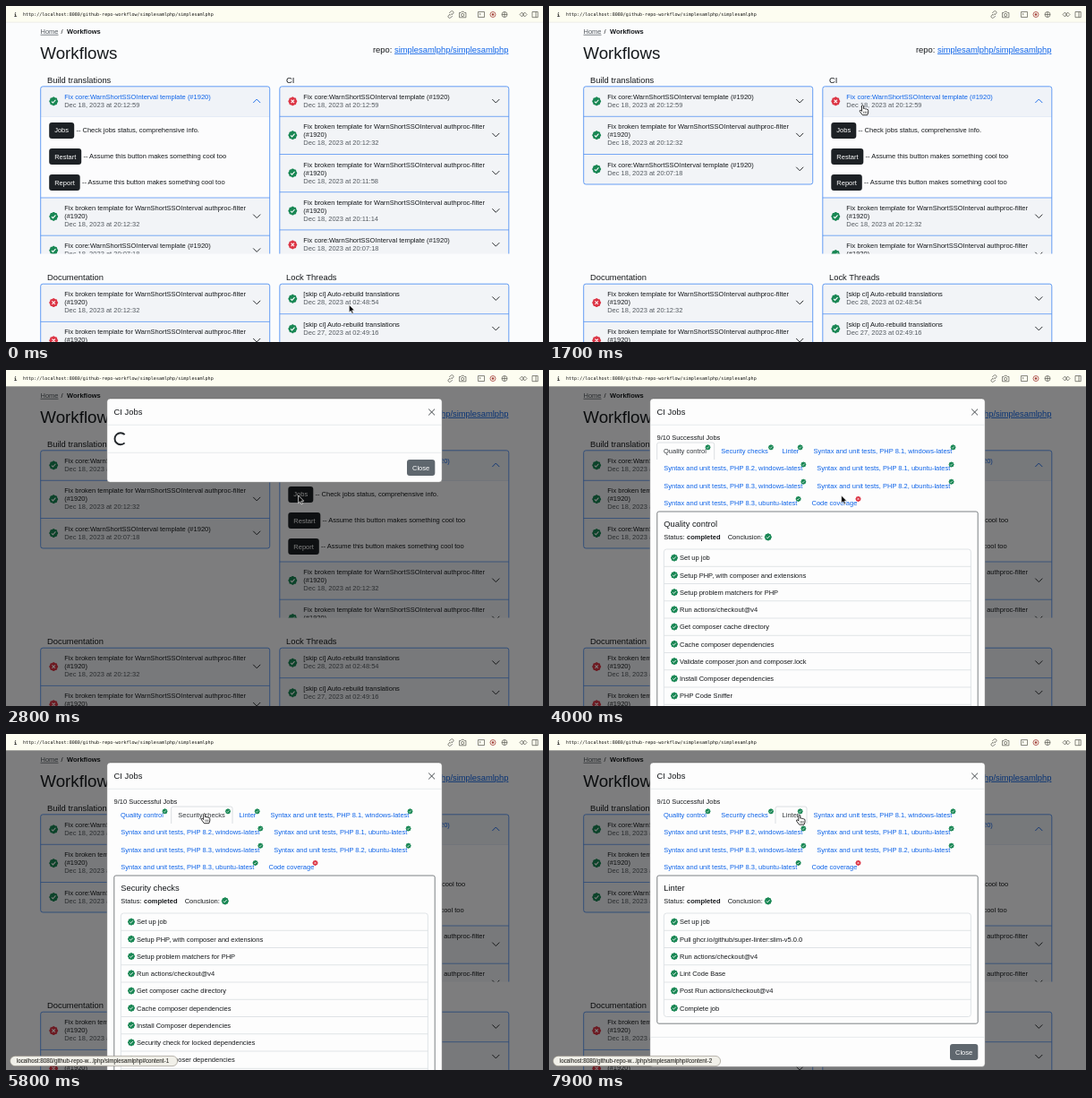
These frames come from a looping animation (600x375 px, 8000 ms). An HTML page:

```html
<!DOCTYPE html>
<html lang="en">
<head>
<meta charset="utf-8">
<title>Workflows</title>
<style>
html, body { margin: 0; width: 100%; height: 100%; overflow: hidden; background: #fbfcfd; }
svg { display: block; width: 600px; height: 375px; font: 7.5px "Liberation Sans", Arial, sans-serif; }
.mono { font-family: "DejaVu Sans Mono", monospace; }
</style>
</head>
<body>
<svg viewBox="0 0 600 375">
  <defs>
    <clipPath id="top"><rect y="89" width="600" height="187.5"/></clipPath>
    <path id="tick" d="M-2.1 .2L-.7 1.6L2.1-1.5" fill="none" stroke="#fff" stroke-width="1"/>
    <path id="cross" d="M-1.6-1.6L1.6 1.6M1.6-1.6L-1.6 1.6" fill="none" stroke="#fff" stroke-width="1"/>
    <path id="arrow" d="M0 0V8.6L2 6.8L3.4 9.9L4.9 9.2L3.5 6.2H6.2Z" fill="#000" stroke="#fff" stroke-width=".7"/>
    <g id="hand" fill="#fff" stroke="#000" stroke-width=".8" stroke-linejoin="round">
      <path d="M-1 1Q0-.6 1 1V4.2Q2.3 3.2 2.9 4.5Q4.2 3.7 4.7 5Q6.2 4.6 6.2 6.2V8.4L5.2 11.2H-.2L-3.2 7.2Q-3.6 5.6-2.2 5.8L-1 7Z"/>
      <path d="M1.2 7V9.6M2.8 7V9.6M4.4 7V9.6" stroke-width=".5"/>
    </g>
  </defs>
  <g id="page"></g>
  <rect id="shade" y="18" width="600" height="357"/>
  <g id="modal"></g>
  <g id="bar"></g>
  <g id="status"></g>
  <g id="cursor"></g>
</svg>
<script>
const LOOP = 8000, GREEN = '#198754', RED = '#dc3545', BLUE = '#0d63e8', INK = '#16191c';
const OPEN_CI = 1200, OPEN_MODAL = 2290, LOADED = 3500, TAB_CLICKS = [5500, 7400];

const clamp = v => Math.max(0, Math.min(1, v));
const span = (t, start, length) => clamp((t - start) / length);
const smooth = p => p * p * (3 - 2 * p);

// Drawing helpers
const text = (x, y, s, fill = INK, more = '') => `<text x="${x}" y="${y}" fill="${fill}" ${more}>${s}</text>`;
const big = (x, y, s) => text(x, y, s, INK, 'font-size="9.375"');
const rect = (x, y, w, h, fill, more = '') =>
  `<rect x="${x}" y="${y}" width="${w}" height="${h}" fill="${fill}" ${more}/>`;
const path = (d, stroke, width = 1) => `<path d="${d}" fill="none" stroke="${stroke}" stroke-width="${width}"/>`;
const button = (x, y, w, s, fill) => rect(x, y, w, 18, fill, 'rx="3"') + text(x + 6, y + 11.6, s, '#fff');

function badge(x, y, ok, r = 4) {
  const points = Array.from({ length: 64 }, (_, i) => {
    const a = i * Math.PI / 32, d = r * (1 + .06 * Math.cos(8 * a));
    return (d * Math.cos(a)).toFixed(2) + ',' + (d * Math.sin(a)).toFixed(2);
  });
  return `<g transform="translate(${x} ${y})"><polygon points="${points.join(' ')}" fill="${ok ? GREEN : RED}"/>` +
    `<use href="#${ok ? 'tick' : 'cross'}" transform="scale(${r / 4.4})"/></g>`;
}

// Page
const CORE = ['Fix core:WarnShortSSOInterval template (#1920)'];
const BROKEN = ['Fix broken template for WarnShortSSOInterval authproc-filter', '(#1920)'];
const SKIP = ['[skip ci] Auto-rebuild translations'];
const run = (ok, lines, time, day = 18) => ({ ok, lines, date: `Dec ${day}, 2023 at ${time}` });

const BUILD = [run(1, CORE, '20:12:59'), run(1, BROKEN, '20:12:32'), run(1, CORE, '20:07:18')];
const CI = [run(0, CORE, '20:12:59'), run(1, BROKEN, '20:12:32'), run(1, BROKEN, '20:11:58'),
  run(1, BROKEN, '20:11:14'), run(0, CORE, '20:07:18')];
const DOCS = [run(0, BROKEN, '20:12:32'), run(0, BROKEN, '20:11:58')];
const LOCK = [run(1, SKIP, '02:48:54', 28), run(1, SKIP, '02:49:16', 27)];
const ACTIONS = [['Jobs', 28, 'Check jobs status, comprehensive info.'],
  ['Restart', 36, 'Assume this button makes something cool too'],
  ['Report', 34.5, 'Assume this button makes something cool too']];

function card(x, top, runs, open = 0) {
  let y = top, out = '';
  runs.forEach((r, i) => {
    const h = r.lines.length > 1 ? 42.2 : 33.5, p = i ? 0 : open, mid = y + h / 2;
    out += rect(x, y, 256, h, p > .5 ? '#f0f3f8' : '#f2f4f7');
    if (i) out += path(`M${x} ${y}h256`, '#3f86f2', .7);
    out += badge(x + 14.5, mid - .2, r.ok, 4.7);
    r.lines.forEach((s, n) => out += text(x + 26.5, y + 14 + 9 * n, s, p > .5 ? BLUE : INK));
    out += text(x + 26.5, y + 14 + 9 * r.lines.length, r.date, '#555b61');
    out += `<g transform="translate(${x + 241.5} ${mid - .5}) rotate(${-180 * p})">` +
      path('M-4-2L0 2L4-2', p > .5 ? BLUE : INK, .9) + '</g>';
    y += h;
    if (p) {
      const body = 90.7 * p;
      out += `<svg x="${x}" y="${y}" width="256" height="${body}" style="width:256px;height:${body}px">` +
        rect(0, 0, 256, 91, '#fcfcfd') + path('M0 .2h256', '#c9d8ee', .6) +
        ACTIONS.map(([name, w, note], n) => {
          const at = 6.6 + 29.1 * n;
          return button(9.5, at, w, name, '#1d2125') + text(w + 11.7, at + 11.2, '-- ' + note);
        }).join('') + '</svg>';
      y += body;
    }
  });
  return out + rect(x, top, 256, y - top, 'none', 'rx="2.5" stroke="#3f86f2" stroke-width=".8"');
}

function page(t) {
  const p = smooth(span(t, OPEN_CI, 350));
  return rect(0, 0, 600, 375, '#fbfcfd') +
    text(38.5, 30.8, 'Home', '#555b61', 'text-decoration="underline"') + text(61.5, 30.8, '/') +
    text(68, 30.8, 'Workflows', INK, 'font-weight="bold"') +
    text(38.3, 59.3, 'Workflows', INK, 'font-size="18.75"') +
    big(410, 51.8, 'repo:') +
    text(434, 51.8, 'simplesamlphp/simplesamlphp', '#0d63e8', 'font-size="9.375" text-decoration="underline"') +
    big(46, 85.5, 'Build translations') + big(313, 85.5, 'CI') +
    `<g clip-path="url(#top)">${card(38.7, 89.8, BUILD, 1 - p)}${card(305.8, 89.8, CI, p)}</g>` +
    big(46, 305.8, 'Documentation') + big(313, 305.8, 'Lock Threads') +
    card(38.7, 310.2, DOCS) + card(305.8, 310.2, LOCK);
}

// Modal
const unit = (php, os) => `Syntax and unit tests, PHP ${php}, ${os}-latest`;
// label, text x, row, badge x
const TABS = [['Quality control', 128, 0, 177.5], ['Security checks', 192.3, 0, 248], ['Linter', 260.6, 0, 280.7],
  [unit('8.1', 'windows'), 295.5, 0, 451.5], [unit('8.2', 'windows'), 128.3, 1, 284.3],
  [unit('8.1', 'ubuntu'), 299.2, 1, 449.6], [unit('8.3', 'windows'), 128.3, 2, 284.3],
  [unit('8.2', 'ubuntu'), 299.2, 2, 449.6], [unit('8.3', 'ubuntu'), 128.3, 3, 278.6],
  ['Code coverage', 293.5, 3, 345.5]];
const EDGES = [120.7, 184.7, 253, 288];
const SETUP = ['Set up job', 'Setup PHP, with composer and extensions', 'Setup problem matchers for PHP',
  'Run actions/checkout@v4', 'Get composer cache directory', 'Cache composer dependencies'];
const STEPS = [
  [...SETUP, 'Validate composer.json and composer.lock', 'Install Composer dependencies', 'PHP Code Sniffer', ''],
  [...SETUP, 'Install Composer dependencies', 'Security check for locked dependencies', 'Update Composer dependencies', ''],
  ['Set up job', 'Pull ghcr.io/github/super-linter:slim-v5.0.0', 'Run actions/checkout@v4', 'Lint Code Base',
    'Post Run actions/checkout@v4', 'Complete job']];

function jobs(t) {
  const active = TAB_CLICKS.filter(c => t >= c).length;
  const since = active ? t - TAB_CLICKS[active - 1] : 1e4;
  const shown = since < 150 ? active - 1 : active;
  const alpha = since < 150 ? 1 - since / 150 : clamp((since - 150) / 150);
  const steps = STEPS[shown], listH = 19.25 * steps.length, bottom = 200 + listH + 7.7;
  const left = EDGES[active], right = EDGES[active + 1];
  let out = text(120.5, 77.5, '9/10 Successful Jobs') +
    path(`M${left} 100V83q0-2 2-2H${right - 2}q2 0 2 2V100`, '#d3d7db', .8);
  TABS.forEach(([name, x, row, mark], i) => {
    const y = 93.2 + 19.2 * row;
    out += text(x, y, name, i === active ? '#33383d' : BLUE) + badge(mark, y - 6.9, i < 9, 2.9);
  });
  out += rect(120.8, 158, 358.4, bottom - 158, 'none', 'rx="2" stroke="#6f7377" stroke-width=".9"');
  out += `<g opacity="${alpha}">` + big(128.2, 175.2, TABS[shown][0]) +
    text(128.2, 189.2, 'Status:') + text(154, 189.2, 'completed', INK, 'font-weight="bold"') +
    text(199.7, 189.2, 'Conclusion:') + badge(244.8, 186.4, 1, 3.9) +
    rect(128.4, 200, 343, listH, 'none', 'rx="3" stroke="#d9dde1" stroke-width=".8"');
  steps.forEach((s, i) => {
    const y = 200 + 19.25 * i;
    if (i) out += path(`M128.4 ${y}h343`, '#d9dde1', .8);
    out += badge(140, y + 9.6, 1, 3.8) + text(146, y + 12.3, s);
  });
  return { out: out + '</g>', line: bottom + 15.2 };
}

function modal(t) {
  const p = span(t, OPEN_MODAL + 150, 300);
  if (!p) return '';
  const ease = 1 - (1 - p) ** 2;
  const spinner = `<g transform="rotate(${(t - 2800) / 750 * 360} 128 76.7)">` +
    path('M132.6 72.1A6.5 6.5 0 1 0 132.6 81.3', '#212529', 1.9) + '</g>';
  const { out, line } = t < LOADED ? { out: spinner, line: 92.3 } : jobs(t);
  return `<g opacity="${ease}" transform="translate(0 ${-23.4 * (1 - ease)})">` +
    rect(112.8, 32, 374.4, line + 33 - 32, '#fdfdfd', 'rx="3.6" stroke="#555" stroke-width=".4"') +
    big(120.6, 50.3, 'CI Jobs') + path('M472.2 43.6l6.8 6.8m0-6.8l-6.8 6.8', '#42474b', 1) +
    path(`M113 61.3h374M113 ${line}h374`, '#dee2e6', .7) + out +
    button(448, line + 7.6, 31.3, 'Close', '#5f676e') + '</g>';
}

// Browser parts
const bar = rect(0, 0, 600, 18, '#fdfdf1') + path('M0 18.2h600', '#dedfd6', .5) +
  text(8.7, 11.5, 'i', '#222', 'class="mono" font-size="6" font-weight="bold"') +
  text(19, 11.3, 'http://localhost:8080/github-repo-workflow/simplesamlphp/simplesamlphp', '#111',
    'class="mono" font-size="5.06"') +
  path('M496 9l-1.6 1.6a1.7 1.7 0 0 0 2.4 2.4l2-2M498 10l1.6-1.6a1.7 1.7 0 0 0-2.4-2.4l-2 2M495.8 10.8l2.4-2.6' +
    'M506.5 7.5h1.6l1-1.2h2.2l1 1.2h1.6v5.3h-7.4zM511.8 10a1.6 1.6 0 1 0-3.2 0a1.6 1.6 0 1 0 3.2 0' +
    'M527.5 6.5h7v6h-7zM529 8.2l1.2 1l-1.2 1M554 9.5h6M557 6.5v6M560 9.5a3 3 0 1 0-6 0a3 3 0 1 0 6 0' +
    'M576.5 7l-2.5 2.5l2.5 2.5M579.5 7l2.5 2.5l-2.5 2.5M576.5 7l3 5M579.5 7l-3 5' +
    'M588 6.5h6.2v6.2h-6.2zM592 6.5v6.2', '#55554f', .7) +
  '<circle cx="544" cy="9.5" r="3" fill="none" stroke="#a33d38" stroke-width=".8"/><circle cx="544" cy="9.5" r="1.3" fill="#a33d38"/>';

function status(t) {
  const n = t >= 5520 && t < 6650 ? 1 : t >= 6980 ? 2 : 0;
  return n ? rect(4.6, 359.4, 187, 11.2, '#f1f0e9', 'rx="5.6" stroke="#8d897d" stroke-width=".6"') +
    text(11.8, 367.2, `localhost:8080/github-repo-w...lphp/simplesamlphp#content-${n}`, '#33322e',
      'font-size="6.27" stroke="#33322e" stroke-width=".12"') : '';
}

// start, end, target x, target y
const MOVES = [[300, 1050, 350.5, 110.5], [1800, 2200, 326.6, 140], [4700, 5400, 221.6, 88.5], [6500, 7000, 279.8, 90]];
const HAND = [[950, 1850], [2120, 2300], [5250, 8000]];

function cursor(t) {
  let x = 383.3, y = 333.5;
  for (const [a, b, tx, ty] of MOVES) {
    const p = smooth(span(t, a, b - a));
    x += (tx - x) * p;
    y += (ty - y) * p;
  }
  const kind = HAND.some(([a, b]) => t >= a && t < b) ? 'hand' : 'arrow';
  return `<use href="#${kind}" x="${x}" y="${y}"/>`;
}

const layers = { page, modal, status, cursor }, last = {};
const el = id => document.getElementById(id);
el('bar').innerHTML = bar;

function frame(now) {
  const t = now % LOOP;
  for (const id in layers) {
    const markup = layers[id](t);
    if (markup !== last[id]) el(id).innerHTML = last[id] = markup;
  }
  el('shade').setAttribute('opacity', .5 * span(t, OPEN_MODAL, 150));
  requestAnimationFrame(frame);
}
const start = performance.now();
const tick = () => frame(performance.now() - start);
requestAnimationFrame = (raf => () => raf.call(window, tick))(requestAnimationFrame);
tick();
</script>
</body>
</html>
```
